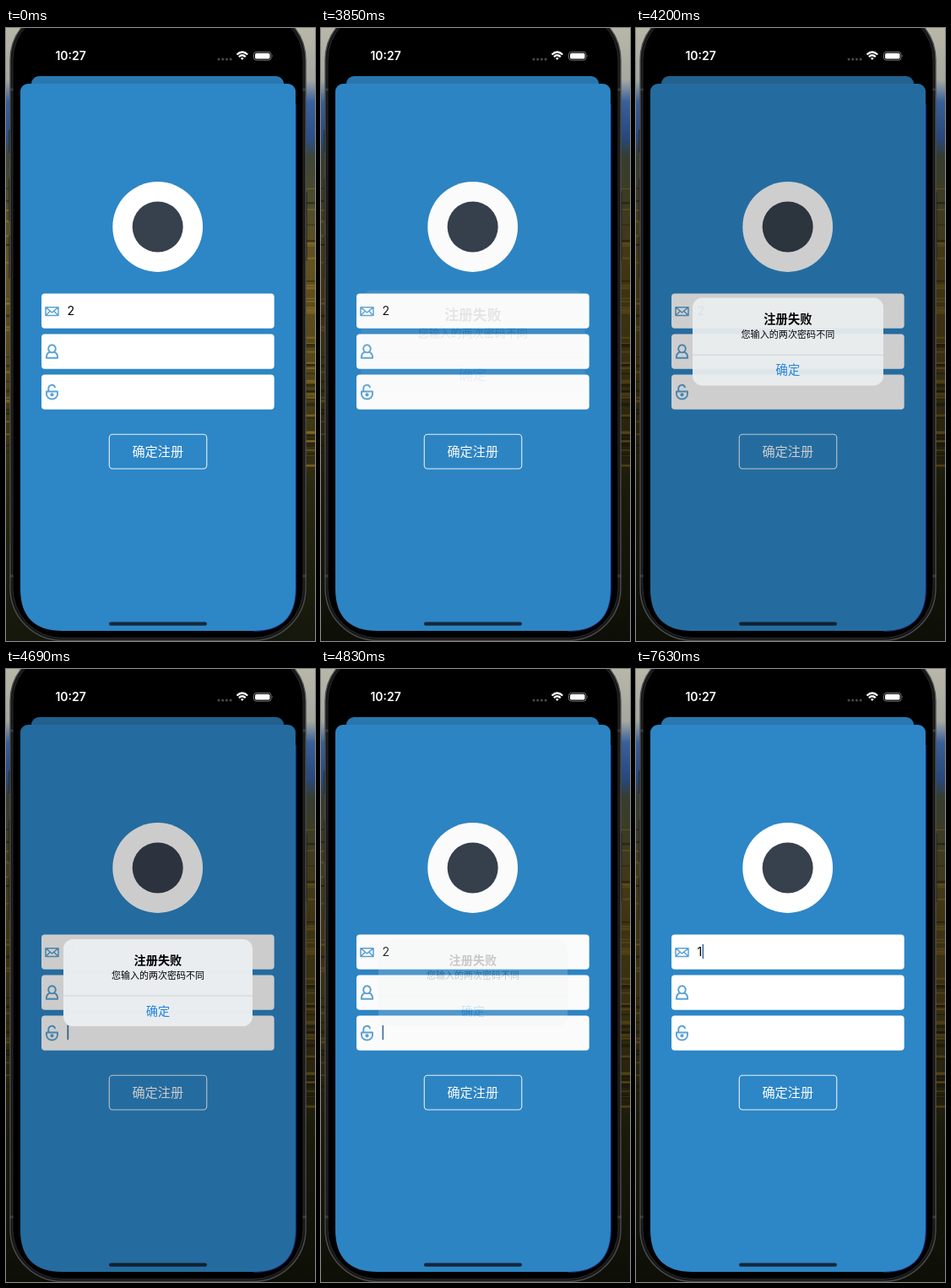
These frames come from a looping animation (366 px wide and 726 px high, 8 s). An HTML page:

```html
<!DOCTYPE html>
<html lang="zh-CN">
<head>
<meta charset="utf-8">
<title>注册</title>
<style>
  html, body { margin: 0; width: 100%; height: 100%; overflow: hidden; background: #000; }
  svg { display: block; width: 366px; height: 726px; }
  text { font-family: "Inter", "Noto Sans CJK SC", "Noto Sans CJK JP", sans-serif; }
  .cjk { font-family: "Noto Sans CJK SC", "Noto Sans CJK JP", "Noto Sans CJK", sans-serif; text-anchor: middle; }
  .icon { fill: none; stroke: #5aa3d6; stroke-width: 1.9; stroke-linejoin: round; stroke-linecap: round; }
</style>
</head>
<body>
<svg viewBox="0 0 366 726" xmlns="http://www.w3.org/2000/svg">
  <defs>
    <linearGradient id="view" x2="0" y2="1">
      <stop offset="0" stop-color="#b9b7a8"/>
      <stop offset=".085" stop-color="#a5a89f"/>
      <stop offset=".12" stop-color="#3a629c"/>
      <stop offset=".18" stop-color="#2c4f88"/>
      <stop offset=".21" stop-color="#3d4636"/>
      <stop offset=".38" stop-color="#62521e"/>
      <stop offset=".55" stop-color="#544718"/>
      <stop offset=".75" stop-color="#292810"/>
      <stop offset="1" stop-color="#14170b"/>
    </linearGradient>
    <linearGradient id="shadeFall" x2="0" y2="1">
      <stop offset=".1" stop-opacity="0"/>
      <stop offset=".4" stop-opacity=".35"/>
      <stop offset="1" stop-opacity=".35"/>
    </linearGradient>
    <clipPath id="screen">
      <path d="M17 40H343V664Q343 714 293 714H67Q17 714 17 664Z"/>
    </clipPath>
  </defs>

  <rect width="366" height="726" fill="url(#view)"/>
  <g id="rows"></g>
  <rect id="shade" width="366" height="726" fill="url(#shadeFall)"/>

  <!-- device -->
  <g fill="#1c1c1d">
    <rect x="3.5" y="120" width="3" height="28" rx="1"/>
    <rect x="3.5" y="178" width="3" height="52" rx="1"/>
    <rect x="3.5" y="245" width="3" height="52" rx="1"/>
    <rect x="353.5" y="194" width="3" height="82" rx="1"/>
  </g>
  <rect x="5" y="-24" width="350" height="749.5" rx="62" fill="#161617" stroke="#4b4c4e" stroke-width="1.4"/>
  <rect x="8" y="-21" width="344" height="743.5" rx="59" stroke="#2b2b2d"/>
  <path d="M4.5 73h4M351.5 73h4M4.5 649h4M351.5 649h4" stroke="#5a5a5a" stroke-width="3" stroke-opacity=".5"/>

  <!-- status bar -->
  <text x="76.6" y="37.9" font-size="14" font-weight="600" fill="#fff" text-anchor="middle">10:27</text>
  <path d="M252 37H268" stroke="#4c4c4c" stroke-width="3" stroke-linecap="round" stroke-dasharray="0 4.7"/>
  <g fill="none" stroke="#fff" stroke-width="2.2">
    <path d="M273.5 31.5Q279.8 25.5 286.2 31.5M275.9 34.1Q279.8 30.4 283.8 34.1"/>
    <path d="M277.9 35.8Q279.8 34.3 281.7 35.8L279.8 38Z" fill="#fff" stroke="none"/>
  </g>
  <rect x="293.5" y="28.3" width="20.5" height="9.8" rx="3" fill="none" stroke="#777"/>
  <rect x="295" y="29.8" width="17.5" height="6.8" rx="1.7" fill="#fff"/>
  <path d="M315.2 31.6q1.5 1.6 0 3.2z" fill="#777"/>

  <path d="M343.7 90V664Q343 714 293 714.5" fill="none" stroke="#1a1f66" stroke-width="1.4"/>
  <g clip-path="url(#screen)">
    <rect x="30" y="57" width="299" height="60" rx="9" fill="#2a78b1"/>
    <rect x="17" y="66" width="326" height="700" rx="9" fill="#2d86c6"/>
    <circle cx="179.7" cy="235.5" r="53.4" fill="#fff"/>
    <circle cx="179.7" cy="235.5" r="30" fill="#37404d"/>

    <g id="fields" fill="#fff"></g>
    <g class="icon">
      <path d="M47 330.7H62V340.5H47ZM47.5 331.2L54.5 337L61.5 331.2M47.5 340L52 335.5M61.5 340L57 335.5" stroke-width="1.5"/>
      <path d="M54.5 375.2a4.3 4.6 0 1 1-.01 0ZM51 384.2Q47.8 386 47.8 390.7H61.2Q61.2 386 58 384.2"/>
      <path d="M48 430.5H61V433.5A6.5 6 0 0 1 48 433.5ZM50.3 430V426.5A4 4 0 0 1 58 425.3"/>
      <circle cx="54.5" cy="434.3" r="1.2" fill="#5aa3d6"/>
    </g>
    <text id="mail" x="72.6" y="340.2" font-size="14.2"></text>
    <circle id="dot" cx="76.7" r="3.5"/>
    <rect id="caret" width="1.7" height="17.5" rx=".8" fill="#41719f"/>

    <rect x="122.3" y="481.2" width="115.5" height="40.8" rx="4" fill="none" stroke="#fff" stroke-opacity=".9" stroke-width="1.1"/>
    <text id="submit" class="cjk" x="179.8" y="507.3" font-size="15.2" fill="#fff">确定注册</text>
    <rect x="122" y="703.6" width="116" height="4.2" rx="2.1" fill="#14293b"/>

    <path id="dim" d="M30 66Q30 57 39 57H320Q329 57 329 66H334Q343 66 343 75V714H17V75Q17 66 26 66Z"/>
    <g id="alert">
      <rect x="68" y="320" width="224" height="103" rx="11.5" fill="#eaeef0" fill-opacity=".985"/>
      <path id="pressed" d="M68 387H292V411.5Q292 423 280.5 423H79.5Q68 423 68 411.5Z" fill="#000" fill-opacity=".08"/>
      <path d="M68 387H292" stroke="#c5cacd" stroke-width=".8"/>
      <text class="cjk" x="179.9" y="350.3" font-size="14.2" font-weight="700">注册失败</text>
      <text class="cjk" x="179.9" y="367" font-size="11">您输入的两次密码不同</text>
      <text class="cjk" x="179.9" y="410" font-size="14.2" fill="#1f82df">确定</text>
    </g>
  </g>
</svg>
<script>
const LOOP = 8000, STEP = 70;
const ROW = 48, FIRST = 314.5;
const FADE = 140, IDLE = 640;
const ALERT_OPENS = 3840, ALERT_CLOSES = 4700;

// Moments at which the user moves the focus or types.
const actions = [
  { time: 980, focus: 0 },
  { time: 1470, focus: 1 },
  { time: 1960, type: "●" },
  { time: 3010, focus: 2 },
  { time: 3360, type: "●" },
  { time: 3850, focus: -1 },
  { time: 4690, focus: 2 },
  { time: 5320, focus: 1 },
  { time: 6300, type: "●" },
  { time: 6580, focus: 0 },
  { time: 7280, type: "" },
  { time: 7630, type: "1" }
];
const caretX = { "": 72.5, "1": 78.5, "2": 80.8, "●": 80.5 };

const $ = id => document.getElementById(id);
const set = (id, attrs) => {
  for (const key in attrs) $(id).setAttribute(key, attrs[key]);
};
const clamp = v => Math.min(1, Math.max(0, v));
const during = (t, from, to) => t >= from && t < to;
const settle = (age, tau) => age < 0 ? 0 : 1 - Math.exp(-age / tau);
const rowY = field => FIRST + field * ROW;

let seed = 7;
const random = () => (seed = seed * 16807 % 2147483647) / 2147483647;

$("fields").innerHTML = [0, 1, 2].map(i =>
  `<rect x="42" y="${rowY(i)}" width="275.7" height="41.3" rx="4"/>`).join("");
$("rows").innerHTML = Array.from({ length: 90 }, () => {
  const y = 190 + 330 * random();
  const color = random() < .5 ? "#a07c28" : "#1d1a08";
  return `<path d="M${random() < .3 ? 0 : 354} ${y}h12" stroke="${color}" stroke-width="${1 + 2 * random()}" stroke-opacity=".5"/>`;
}).join("");

// Secure fields are emptied whenever the focus moves.
function formAt(t) {
  const form = { mail: "2", secret: "", field: -1, since: 0 };
  for (const { time, focus, type } of actions) {
    if (time > t) break;
    form.since = time;
    if (focus !== undefined) {
      form.field = focus;
      form.secret = "";
    } else {
      form[form.field ? "secret" : "mail"] = type;
    }
  }
  return form;
}

function drawForm(t) {
  const { mail, secret, field, since } = formAt(t);
  const age = t - since;
  $("mail").textContent = mail;
  set("dot", { cy: rowY(field) + 20.7, opacity: secret ? 1 : 0 });
  set("caret", {
    x: caretX[field ? secret : mail],
    y: rowY(field) + 11.3,
    opacity: field < 0 ? 0 : 1 - clamp((age - IDLE) / FADE)
  });
  set("submit", { opacity: during(t, 3640, 3850) ? .3 : 1 });
}

function drawAlert(t) {
  const opened = settle(t - ALERT_OPENS, 115);
  const closed = tau => 1 - settle(t - ALERT_CLOSES, tau);
  const scale = 1 + .2 * (1 - opened);
  set("dim", { opacity: .2 * opened * closed(50) });
  set("alert", {
    opacity: opened * closed(80),
    transform: `translate(180 372) scale(${scale}) translate(-180 -372)`
  });
  set("pressed", { opacity: during(t, 4550, 4690) ? 1 : 0 });
}

function draw(t) {
  set("shade", { opacity: clamp((t - 840) / 210) });
  drawForm(t);
  drawAlert(t);
}

const start = performance.now();
function tick() {
  const t = (performance.now() - start) % LOOP;
  draw(Math.floor(t / STEP) * STEP);
  requestAnimationFrame(tick);
}
tick();
</script>
</body>
</html>
```
